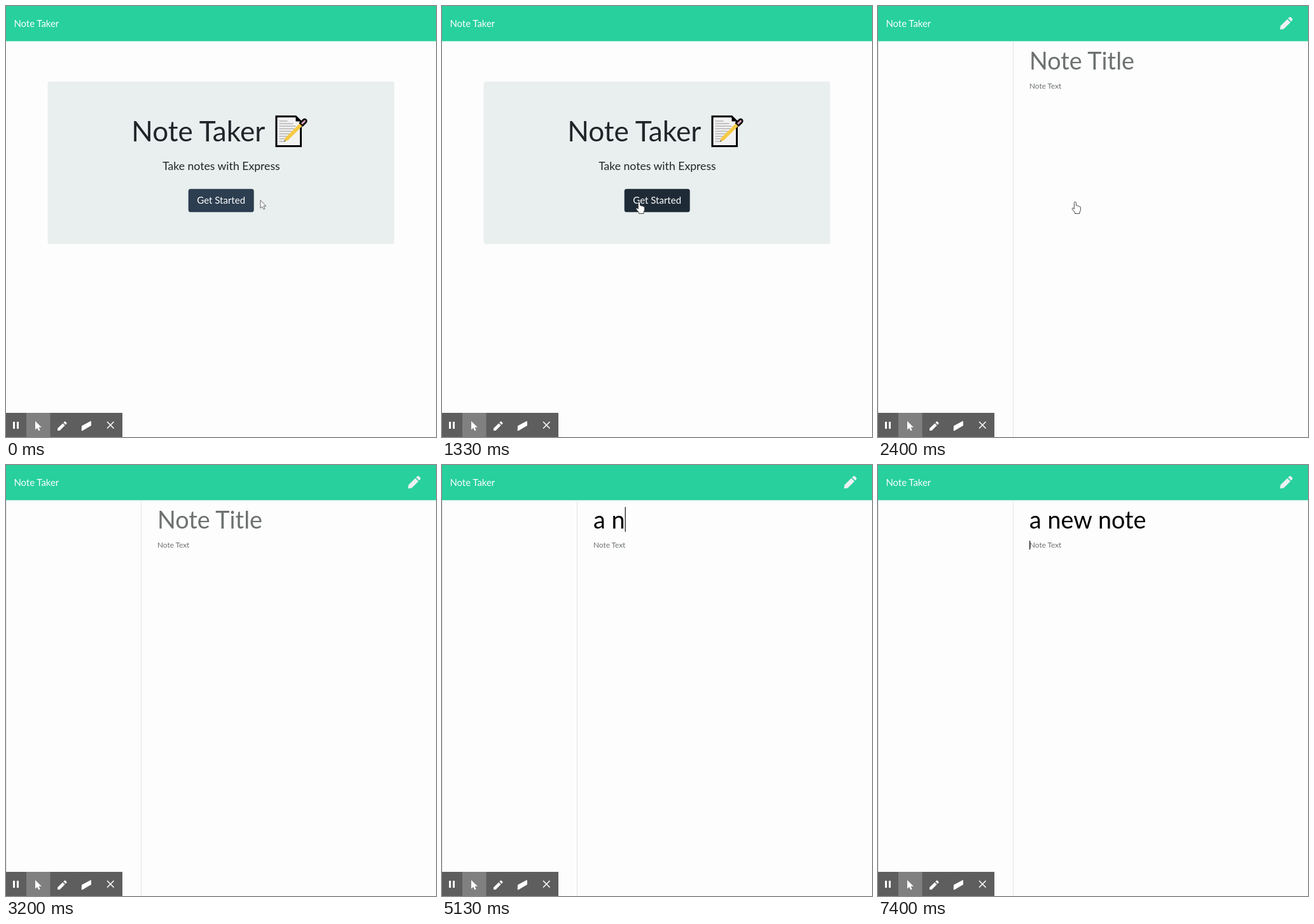
Recreate the animation shown at these times as an HTML page. Size 676 px wide and 678 px high, loop 8 s.

```html
<!DOCTYPE html>
<html lang="en">
<head>
<meta charset="utf-8">
<title>Note Taker</title>
<style>
  html, body { margin: 0; width: 100%; height: 100%; overflow: hidden; background: #fdfdfd; }
  svg { display: block; font-family: Lato, sans-serif; }
  text { white-space: pre; }
  .mid { text-anchor: middle; }
  .placeholder { fill: #6c7170; }
</style>
</head>
<body>
<svg width="676" height="678" viewBox="0 0 676 678">
  <rect width="676" height="678" fill="#fdfdfd"/>
  <rect width="676" height="55.4" fill="#27d09d"/>
  <text x="12.4" y="33" font-size="14.9" fill="#fff">Note Taker</text>

  <g id="home">
    <rect x="65.5" y="118.8" width="544.8" height="255.6" rx="4" fill="#e9efee"/>
    <text x="197.2" y="212.5" font-size="44.15" fill="#212529">Note Taker</text>
    <g id="memo">
      <path d="M425 173.7h30.500l8 8v38.800H425z" fill="#f2f2f2" stroke="#000" stroke-width="3"/>
      <path d="M455.5 173.5v8h8z" fill="#000"/>
      <path d="M429.5 181h13M429.5 185h22M429.5 189h26M429.5 193h24M429.5 197h20M429.5 201h17M429.5 205h13M429.5 209h11M429.5 213h9"
            stroke="#b4b4b4" stroke-width="1.5"/>
      <path d="M462 184.500l5.500-5.500a2.800 2.800 0 0 1 4 4l-5.500 5.500z" fill="#d9a0b4" stroke="#000" stroke-width="2.600" stroke-linejoin="round"/>
      <path d="M437 213.500l2.200-6.200 22.300-22.300 4 4-22.300 22.300z" fill="#f6c944"/>
      <path d="M437 213.500l1-2.800 1.800 1.800z" fill="#555"/>
    </g>
    <text class="mid" x="338.4" y="258" font-size="17.62" fill="#212529">Take notes with Express</text>
    <rect id="ring" x="284.2" y="285.2" width="107.4" height="41.6" rx="5.5" fill="#4c5b6a" fill-opacity=".6"/>
    <rect id="button" x="286.7" y="287.7" width="103" height="36.5" rx="3.5"/>
    <text class="mid" x="338.2" y="311" font-size="15" fill="#fff">Get Started</text>
  </g>

  <g id="editor">
    <path d="M.5 55.400V678M212.5 55.400V678" stroke="#dee2e4"/>
    <path d="M632 37l.8-5.7 10.6-10.5 5 5-10.6 10.5zM644.6 19.6l1.9-1.9q1.4-1.1 2.8 0l2 2.1q1.1 1.4 0 2.8l-1.8 1.9z" fill="#ecf0f1"/>
    <text id="title" x="238" y="100" font-size="37.8"></text>
    <text class="placeholder" x="238" y="130" font-size="11.82">Note Text</text>
    <rect id="caret" width="1.3" fill="#222"/>
  </g>

  <g id="toolbar" fill="#fff">
    <rect y="640" width="183" height="38" fill="#5e5e5e"/>
    <rect x="32" y="640" width="37.5" height="38" fill="#808080"/>
    <path d="M11 654h3v11h-3zM17 654h3v11h-3z"/>
    <path d="M46 653v13.5l3.2-2.8 2.2 4.6 2.2-1-2.1-4.5h4.3z"/>
    <path d="M81 668v-3.4l8.2-8.2 3.4 3.4-8.2 8.2zM90.3 655.3l1.5-1.5q.8-.7 1.6 0l1.8 1.8q.7.8 0 1.6l-1.5 1.5z"/>
    <path d="M119 660.5l13.5-7.3q1.5-.5 1.5 1v5.8l-13.5 8q-1.8.8-1.8-1z"/>
    <path d="M159 654l10.5 10.5M169.5 654L159 664.5" stroke="#fff" stroke-width="1.6"/>
  </g>

  <g id="pointer" fill="#fff" stroke="#333" stroke-width=".9" stroke-linejoin="round">
    <path id="arrow" d="M0 0v12.6l2.9-2.6 2.1 4.4 2-.9-2-4.3h3.8z" stroke="#555"/>
    <path id="hand" d="M-1.6 1.6a1.5 1.5 0 0 1 3 0V6q1.3-.8 2.4.6 1.4-.6 2.3.7 2.3-.3 2.3 1.8v4.4l-1.4 2.8v2.2H-.4v-1.6L-4.6 11.7q-.7-1.9 1-2l2 1.5z"/>
  </g>
</svg>
<script>
const LOOP = 8000, TICK = 200 / 3;
const OPEN_EDITOR = 2400;
const TEXT = "a new note";
const KEY_TIMES = [4730, 4930, 5060, 5200, 5330, 5530, 5730, 5930, 6130, 6260];
const $ = id => document.getElementById(id);
const show = (id, on) => $(id).style.display = on ? "" : "none";
const between = (t, from, to) => t >= from && t < to;

function drawPointer(t) {
  const p = Math.min(1, Math.floor((t + 7) / TICK) / 7);
  const ease = p * p * (3 - 2 * p);
  const x = 400 - 90 * ease;
  const y = 305.5 + 2.5 * p + 32 * p * (1 - p);
  const hover = x < 389;
  show("pointer", t < 2930);
  show("arrow", !hover);
  show("hand", hover);
  $("pointer").setAttribute("transform", `translate(${x} ${y})`);
  $("button").setAttribute("fill", hover ? "#1e2b37" : "#2c3e50");
}

function drawEditor(t) {
  const typed = TEXT.slice(0, KEY_TIMES.filter(k => k <= t).length);
  const title = $("title"), caret = $("caret");
  title.textContent = typed || "Note Title";
  title.setAttribute("class", typed ? "" : "placeholder");

  const inBody = t >= 7330;
  show("caret", between(t, 3730, 4260) || between(t, 4730, 6800) || inBody);
  const width = typed && !inBody ? title.getComputedTextLength() : 0;
  caret.setAttribute("x", 238 + width);
  caret.setAttribute("y", inBody ? 119 : 66);
  caret.setAttribute("height", inBody ? 14 : 39);
}

function draw(t) {
  const editing = t >= OPEN_EDITOR;
  show("home", !editing);
  show("editor", editing);
  $("ring").setAttribute("opacity", t < 2060 ? 0 : t < 2130 ? .5 : 1);
  drawPointer(t);
  if (editing) drawEditor(t);
}

const start = performance.now();
function loop() {
  draw((performance.now() - start) % LOOP);
  requestAnimationFrame(loop);
}
loop();
</script>
</body>
</html>
```
